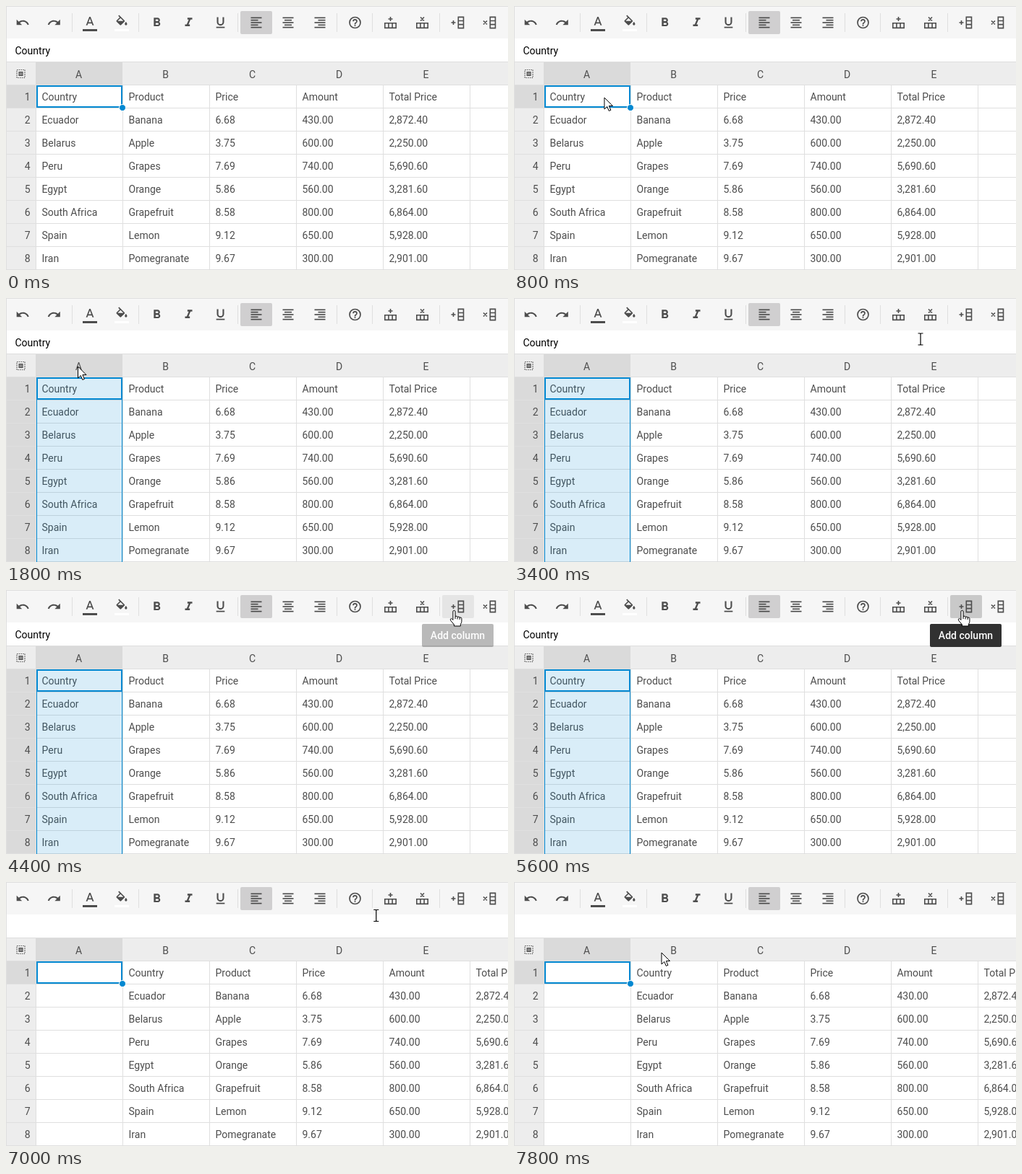
An HTML page for the animation above (8 s loop, 694 px wide and 366 px high).

```html
<!DOCTYPE html>
<html lang="en">
<head>
<meta charset="utf-8">
<style>
  html, body { margin: 0; width: 100%; height: 100%; overflow: hidden; background: #fff; }
  svg { display: block; width: 694px; height: 366px; font: 14px Roboto, sans-serif; fill: #4d4d4d; }
  .mid { text-anchor: middle; }
  .end { text-anchor: end; }
  .line { fill: none; stroke: #dfdfdf; }
  .stroke { fill: none; stroke: #4d4d4d; stroke-width: 1.6; }
  .accent { fill: none; stroke: #0288d1; }
  .cursor { fill: #fff; stroke: #000; stroke-linejoin: round; }
</style>
</head>
<body>
<svg id="stage" viewBox="0 0 694 366"></svg>
<script>
const LOOP = 8000, STEP = 200;
const COL = 120, ROW = 32, LEFT = 41, TOP = 109;

const table = [
  'Country|Product|Price|Amount|Total Price',
  'Ecuador|Banana|6.68|430.00|2,872.40',
  'Belarus|Apple|3.75|600.00|2,250.00',
  'Peru|Grapes|7.69|740.00|5,690.60',
  'Egypt|Orange|5.86|560.00|3,281.60',
  'South Africa|Grapefruit|8.58|800.00|6,864.00',
  'Spain|Lemon|9.12|650.00|5,928.00',
  'Iran|Pomegranate|9.67|300.00|2,901.00'
].map(row => row.split('|'));

const rect = (x, y, w, h, fill, attrs = '') =>
  `<rect x="${x}" y="${y}" width="${w}" height="${h}" fill="${fill}" ${attrs}/>`;
const text = (x, y, str, attrs = '') => `<text x="${x}" y="${y}" ${attrs}>${str}</text>`;
const path = (d, attrs = '') => `<path d="${d}" ${attrs}/>`;
// Icons use a 24-unit box drawn at 20 px
const icon = (x, y, body, flip = 1) =>
  `<g transform="translate(${x} ${y}) scale(${flip * .8333} .8333) translate(-12 -12)">${body}</g>`;
const range = (n, f) => Array.from({ length: n }, (_, i) => f(i)).join('');

const undoIcon = path('M12.5 8C9.85 8 7.45 9 5.6 10.6L2 7V16H11L7.38 12.38C8.77 11.22 10.54 10.5 12.5 10.5C16.04 10.5 19.05 12.81 20.1 16L22.47 15.22C21.08 11.03 17.15 8 12.5 8Z');
const letterIcon = path('M9.62 12L12 5.67L14.37 12M11 3L5.5 17H7.75L8.87 14H15.12L16.25 17H18.5L13 3H11Z');
const bucketIcon = path('M19 11.5S17 13.67 17 15A2 2 0 0 0 21 15C21 13.67 19 11.5 19 11.5M5.21 10L10 5.21L14.79 10M16.56 8.94L7.62 0L6.21 1.41L8.59 3.79L3.44 8.94C2.85 9.5 2.85 10.47 3.44 11.06L8.94 16.56C9.5 17.1 10.5 17.1 11.06 16.56L16.56 11.06C17.15 10.47 17.15 9.5 16.56 8.94Z');
const boldIcon = path('M13.5 15.5H10V12.5H13.5A1.5 1.5 0 0 1 13.5 15.5M10 6.5H13A1.5 1.5 0 0 1 13 9.5H10M15.6 10.79C16.57 10.11 17.25 9 17.25 8C17.25 5.74 15.5 4 13.25 4H7V18H14.04C16.14 18 17.75 16.3 17.75 14.21C17.75 12.69 16.89 11.39 15.6 10.79Z');
const italicIcon = path('M10 4V7H12.21L8.79 15H6V18H14V15H11.79L15.21 7H18V4Z');
const underlineIcon = path('M5 21H19V19H5ZM12 17A6 6 0 0 0 18 11V3H15.5V11A3.5 3.5 0 0 1 8.5 11V3H6V11A6 6 0 0 0 12 17Z');
const helpIcon = '<circle cx="12" cy="12" r="9" fill="none" stroke="#4d4d4d" stroke-width="2"/>' +
  path('M11 18H13V16H11ZM12 6A4 4 0 0 0 8 10H10A2 2 0 0 1 14 10C14 12 11 11.75 11 15H13C13 12.75 16 12.5 16 10A4 4 0 0 0 12 6Z');
const alignIcon = shift => range(5, i => i % 2
  ? rect(3 + shift, 3 + i * 4, 12, 2, '#4d4d4d') : rect(3, 3 + i * 4, 18, 2, '#4d4d4d'));

const plus = (x, y) => `M${x - 3} ${y}h6M${x} ${y - 3}v6`;
const cross = (x, y) => `M${x - 2.5} ${y - 2.5}l5 5m0 -5l-5 5`;
const rowIcon = (x, sign) => path(`M${x - 7.7} 23.8h15.4v6.6h-15.4zm5.1 0v6.6m5.2 0v-6.6${sign(x, 18)}`, 'class="stroke"');
const colIcon = (x, sign) => path(`M${x + .8} 15.4h7.2v15.2h-7.2zm0 5.1h7.2m0 5.1h-7.2${sign(x - 6, 23)}`, 'class="stroke"');

const toolbar = rect(0, 0, 694, 45, '#f6f6f6') +
  rect(324, 7, 44, 32, '#d0cfd0', 'rx="2"') +
  rect(603, 7, 44, 32, '#e5e5e5', 'rx="2" id="button"') +
  path([92, 184, 321, 458, 507, 600].map(x => `M${x - .5} 10v26`).join(''), 'class="line"') +
  icon(23, 23, undoIcon) + icon(66.5, 23, undoIcon, -1) +
  icon(116, 22.5, letterIcon) + rect(106, 32, 20, 3, '#4d4d4d') +
  icon(160, 22.5, bucketIcon) + rect(150, 32, 20, 3, '#fff') +
  icon(208.5, 23, boldIcon) + icon(252.5, 23, italicIcon) + icon(296.5, 23, underlineIcon) +
  icon(346, 23, alignIcon(0)) + icon(390, 23, alignIcon(3)) + icon(434, 23, alignIcon(6)) +
  icon(482.5, 23, helpIcon) +
  rowIcon(531.5, plus) + rowIcon(575.5, cross) + colIcon(624.5, plus) + colIcon(668.5, cross);

const headers = rect(0, 78, 694, 32, '#ededed') + rect(0, TOP, LEFT, 257, '#ededed') +
  rect(LEFT, 78, COL, 32, '#dadada') +
  rect(0, TOP, LEFT, ROW, '#dadada', 'id="rowMark"') +
  rect(15, 88.5, 11, 11, 'none', 'class="stroke" style="stroke-width:1.2" stroke-dasharray="1.4 1.35"') +
  rect(18, 91.5, 5, 5, '#8a8a8a', 'stroke="#4d4d4d"') +
  range(5, i => text(LEFT + COL * (i + .5) - .5, 100, 'ABCDE'[i], 'class="mid"')) +
  range(8, i => text(33.5, 131 + ROW * i, i + 1, 'class="end"'));

const grid = path('M0 .5H694M.5 0V366M0 77.5H694' +
  range(9, i => `M0 ${TOP + .5 + ROW * i}H694`) +
  range(6, i => `M${LEFT + .5 + COL * i} ${TOP}V366`), 'class="line"');

const cellText = table.map((row, r) =>
  row.map((str, c) => text(LEFT + 8.5 + COL * c, 131 + ROW * r, str)).join('')).join('');

const stage = document.getElementById('stage');
stage.innerHTML = toolbar + headers + grid +
  text(12.5, 67, 'Country', 'id="formula" fill="#000"') +
  `<g id="cells">${cellText}</g>` +
  rect(42.5, 110.5, 118, 270, '#0288d1', 'id="column" class="accent" style="fill:#0288d126"') +
  rect(43, 111, 117, 29, 'none', 'class="accent" stroke-width="2"') +
  '<circle id="handle" cx="161" cy="141" r="4.5" fill="#0288d1" stroke="#fff"/>' +
  `<g id="tip">${rect(575, 47, 99, 32, '#313131', 'rx="2"')}${text(624.5, 68, 'Add column', 'class="mid" fill="#fff" font-weight="500"')}</g>` +
  '<g id="pointer">' +
  path('M0 0V16L3.8 12.5L6.3 18.4L8.9 17.3L6.4 11.5H11.5Z', 'id="arrow" class="cursor"') +
  path('M-3.5 -8H-1Q0 -8 0 -7Q0 -8 1 -8H3.5M0 -7V7M-3.5 8H-1Q0 8 0 7Q0 8 1 8H3.5', 'id="beam" fill="none" stroke="#000" stroke-width="1.2"') +
  path('M-1.6 1.5A1.6 1.6 0 0 1 1.6 1.5V8Q4 7 4.6 8.8Q7 7.8 7.6 9.6Q10 8.8 10.4 11V15Q10.4 17 8.8 19V21.5H0V19.5L-4.6 14Q-6 11.4 -4.2 11Q-3 11 -1.6 13ZM4.6 8.8V12M7.6 9.6V12.5M1.6 8V11.5', 'id="hand" class="cursor"') +
  '</g>';

const ui = Object.fromEntries([...stage.querySelectorAll('[id]')].map(el => [el.id, el]));
const show = (el, on) => el.setAttribute('visibility', on ? 'visible' : 'hidden');

const clamp = v => Math.min(1, Math.max(0, v));
const smooth = u => u * u * (3 - 2 * u);
const easeOut = u => 1 - (1 - u) ** 2.6;

// Mouse journeys: start, end, from, to, easing for x and y
const legs = [
  [0, 1400, [330, 385], [99.5, 95], easeOut, easeOut],
  [2600, 4000, [99.5, 95], [619.5, 28.5], easeOut, u => u],
  [6600, 7800, [619.5, 28.5], [204, 98], smooth, smooth]
];

function mouseAt(t) {
  const [start, end, a, b, easeX, easeY] = legs.filter(leg => leg[0] <= t).pop();
  const u = clamp((t - start) / (end - start));
  return [a[0] + (b[0] - a[0]) * easeX(u), a[1] + (b[1] - a[1]) * easeY(u)];
}

function draw(now) {
  const t = Math.floor(now % LOOP / STEP) * STEP;
  const inserted = t >= 5800;
  const selected = t >= 1800 && !inserted;
  const [x, y] = mouseAt(t);
  const overToolbar = y < 40, overFormula = y > 45 && y < 78;

  ui.cells.setAttribute('transform', `translate(${inserted ? COL : 0})`);
  ui.rowMark.setAttribute('height', selected ? 257 : ROW);
  show(ui.formula, !inserted);
  show(ui.column, selected);
  show(ui.handle, !selected);

  show(ui.button, overToolbar && x > 603 && x < 647);
  ui.button.setAttribute('fill', t >= 5200 && !inserted ? '#c9c9c9' : '#e5e5e5');
  ui.tip.setAttribute('opacity', inserted ? 0 : clamp((t - 4200) / 600));

  ui.pointer.setAttribute('transform', `translate(${x} ${y})`);
  show(ui.hand, overToolbar);
  show(ui.beam, overFormula);
  show(ui.arrow, t > 0 && !overToolbar && !overFormula);
}

(function frame() {
  draw(performance.now());
  requestAnimationFrame(frame);
})();
</script>
</body>
</html>
```
